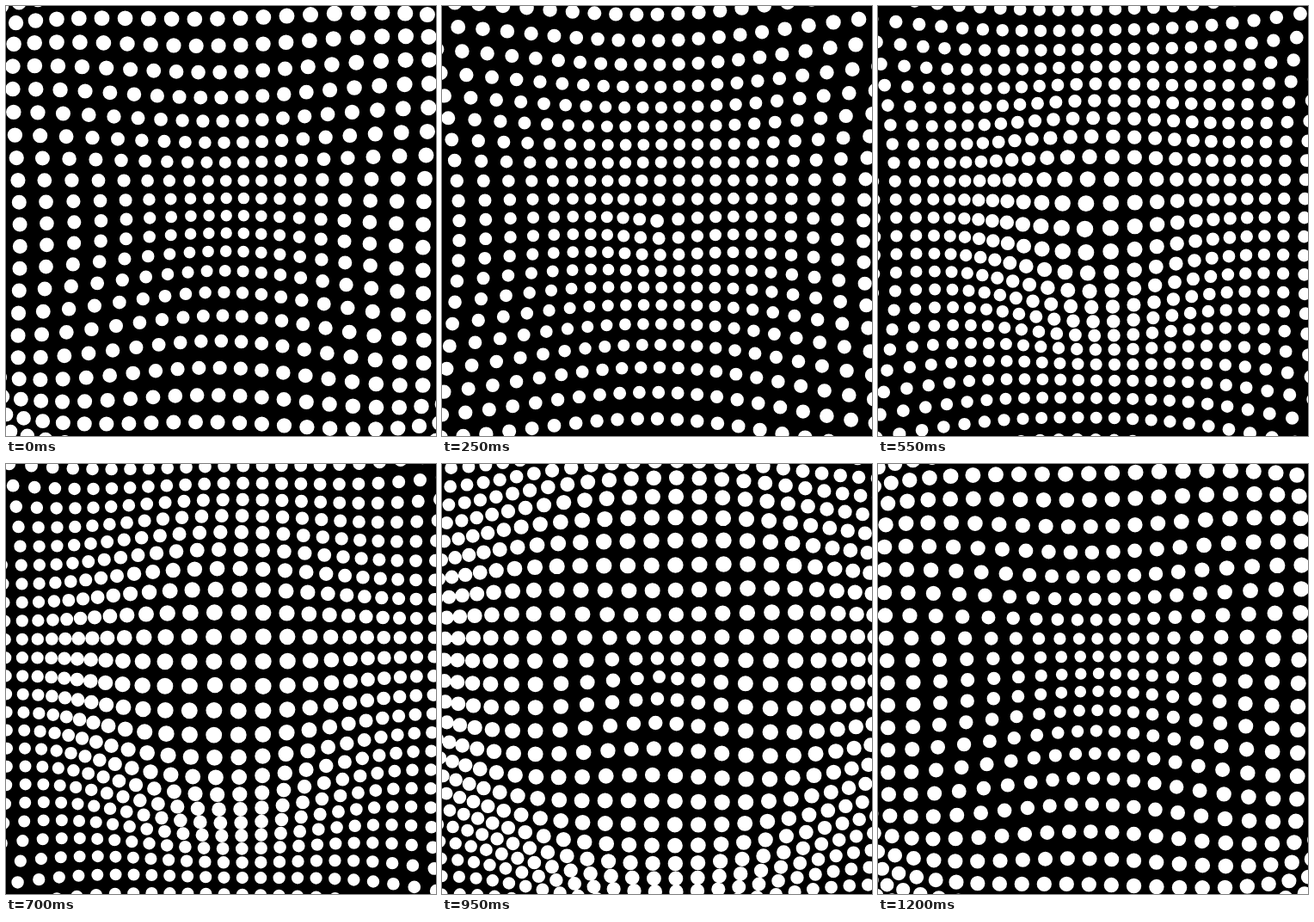
These frames come from a looping animation (500 px wide and 500 px high, 1250 ms). An HTML page with a canvas:

```html
<!DOCTYPE html>
<html lang="en">
<head>
<meta charset="utf-8">
<title>Dot ripple</title>
<style>
  html, body { margin: 0; width: 100%; height: 100%; overflow: hidden; background: #000; }
  canvas { display: block; }
</style>
</head>
<body>
<canvas id="stage" width="500" height="500"></canvas>
<script>
const ctx = document.getElementById('stage').getContext('2d');
const SIZE = 500, CENTER = SIZE / 2;
const LOOP = 1250, STEP = 50;
const REACH = 18;        // grid cells on each side of the centre dot
const SPACING = 23.75, RADIUS = 7.9;
const FOCAL = 700, TILT = 0.0587;
const HEIGHT = 131, DECAY = 0.052;
const PHASE = 0.3, LAG = 0.303;

// Height of the wave running outwards, in pixels towards the viewer.
function waveHeight(distance, turn) {
  return -HEIGHT * Math.exp(-DECAY * distance) * Math.cos(turn + PHASE - LAG * distance);
}

// Dots on a slightly tilted sheet, seen in perspective.
function drawDot(col, row, turn) {
  const u = col * SPACING, v = row * SPACING;
  const h = waveHeight(Math.hypot(col, row), turn);
  const zoom = FOCAL / (FOCAL - h - (u - v) * TILT);
  const x = CENTER + (u - h * TILT) * zoom;
  const y = CENTER + (v + h * TILT) * zoom;
  const r = RADIUS * zoom;
  ctx.moveTo(x + r, y);
  ctx.arc(x, y, r, 0, 2 * Math.PI);
}

function draw(time) {
  const turn = 2 * Math.PI * time / LOOP;
  ctx.fillStyle = '#000';
  ctx.fillRect(0, 0, SIZE, SIZE);
  ctx.fillStyle = '#fff';
  ctx.beginPath();
  for (let row = -REACH; row <= REACH; row++) {
    for (let col = -REACH; col <= REACH; col++) drawDot(col, row, turn);
  }
  ctx.fill();
}

const start = performance.now();
function tick() {
  const elapsed = (performance.now() - start) % LOOP;
  draw(Math.floor(elapsed / STEP) * STEP);
  requestAnimationFrame(tick);
}
tick();
</script>
</body>
</html>
```
